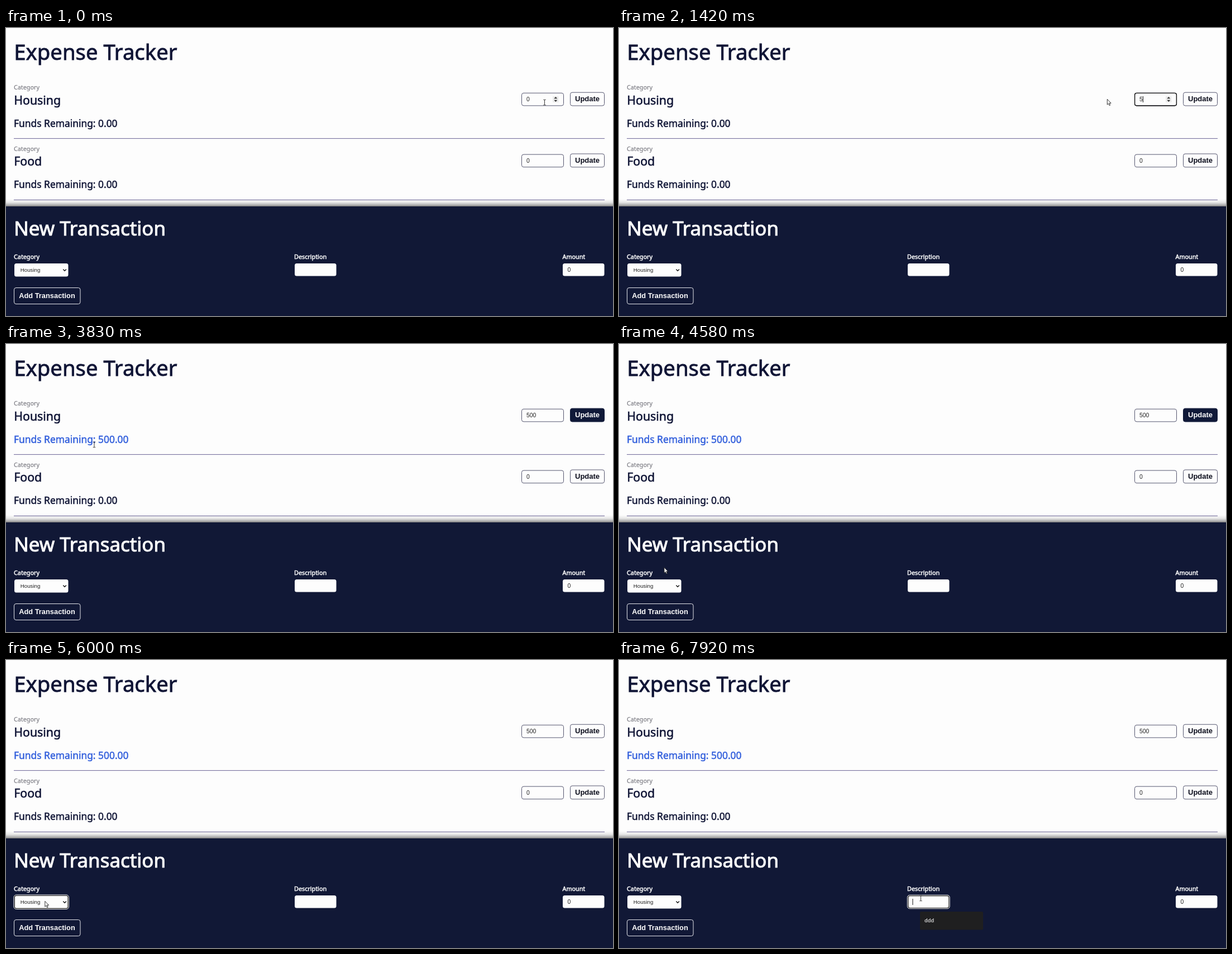
Animation, 1087 px wide and 515 px high, one loop 8 s. Source, as an HTML page:

```html
<!DOCTYPE html>
<html lang="en">
<head>
<meta charset="utf-8">
<title>Expense Tracker</title>
<style>
  html, body { margin: 0; width: 100%; height: 100%; overflow: hidden; background: #fdfdfd; }
  svg { display: block; width: 1087px; height: 515px; }
  text { white-space: pre; }
  .sans { font-family: "Noto Sans", sans-serif; fill: #0f1435; stroke: #0f1435; paint-order: stroke; }
  .title { font-size: 38.3px; stroke-width: .8px; }
  .title2 { font-size: 34.9px; stroke-width: 1px; }
  .name { font-size: 21.3px; stroke-width: .55px; }
  .funds { font-size: 17.4px; stroke-width: .5px; }
  .funds.set { fill: #325fdc; stroke: #325fdc; }
  .tag { font-size: 10.8px; fill: #77777f; stroke: #77777f; stroke-width: .15px; }
  .label { font-size: 10.8px; stroke-width: .5px; }
  .light { fill: #fdfdfd; stroke: #fdfdfd; }
  .ui { font: 10.4px "Liberation Sans", Arial, sans-serif; fill: #222; }
  .small { font-size: 9.7px; }
  .btn { font: bold 13px "Liberation Sans", Arial, sans-serif; fill: #0b0d1c; }
  .box { fill: #fdfdfd; stroke: #565770; }
  .field { fill: #fdfdfd; }
  .rule { stroke: #6a6396; }
  .on rect { fill: #101938; stroke: #101938; }
  .on text { fill: #fdfdfd; }
  .hide { display: none; }
  .ring rect { fill: none; }
</style>
</head>
<body>
<svg viewBox="0 0 1087 515">
  <defs>
    <linearGradient id="shade" x1="0" y1="0" x2="0" y2="1">
      <stop offset="0" stop-color="#000" stop-opacity="0"/>
      <stop offset=".45" stop-color="#000" stop-opacity=".09"/>
      <stop offset=".8" stop-color="#000" stop-opacity=".3"/>
      <stop offset="1" stop-color="#000" stop-opacity=".5"/>
    </linearGradient>
  </defs>
  <rect width="1087" height="515" fill="#fdfdfd"/>
  <text class="sans title" x="14.2" y="56.5">Expense Tracker</text>

  <g id="rows"></g>

  <rect x="0" y="306" width="1087" height="13" fill="url(#shade)"/>
  <rect x="0" y="319" width="1087" height="196" fill="#111836"/>
  <text class="sans title2 light" x="14.2" y="371">New Transaction</text>
  <text class="sans label light" x="14" y="412.5">Category</text>
  <text class="sans label light" x="516" y="412.5">Description</text>
  <text class="sans label light" x="996.5" y="412.5">Amount</text>

  <rect id="select" class="field" x="15" y="421" width="96.5" height="23.5" rx="3.5"/>
  <text class="ui small" x="25.8" y="436">Housing</text>
  <path d="M102.3 431.5l2.8 2.8 2.8-2.8" fill="none" stroke="#111" stroke-width="1.4"/>
  <rect class="field" x="517" y="421" width="74.5" height="22.5" rx="3.5"/>
  <rect class="field" x="997" y="421" width="74.5" height="22.5" rx="3.5"/>
  <text class="ui" x="1005.6" y="436">0</text>

  <rect x="14.5" y="464.5" width="118.5" height="29" rx="3.5" fill="none" stroke="#e4e5ea"/>
  <text class="btn" style="font-size:12.85px;fill:#fdfdfd" x="23.2" y="483">Add Transaction</text>

  <g id="selectRing" class="ring">
    <rect x="15.2" y="421.1" width="96.1" height="23.3" rx="3.4" stroke="#111" stroke-width="1.4"/>
    <rect x="14" y="420" width="98.5" height="25.5" rx="4.5" stroke="#fdfdfd"/>
  </g>
  <g id="descRing" class="ring">
    <rect x="517.6" y="421.6" width="73.4" height="22" rx="3" stroke="#111" stroke-width="1.4"/>
    <rect x="516.4" y="420.4" width="75.8" height="24.2" rx="4.2" stroke="#fdfdfd"/>
  </g>
  <path id="descCaret" d="M526 427v11" stroke="#111"/>
  <g id="hint">
    <rect x="539" y="450" width="113" height="32.5" rx="2" fill="#1f1f20"/>
    <text x="547" y="469.3" font-family="Open Sans, sans-serif" font-weight="600" font-size="9.2" fill="#e4e4e4">ddd</text>
  </g>

  <g id="list"></g>

  <g id="arrow"><path d="M.3.3v9.8l2.2-2 1.6 3.5 1.6-.7-1.6-3.5h3z" fill="#fdfdfd" stroke="#222" stroke-width=".9"/></g>
  <g id="beam"><path d="M-2.2-4.8h1.5q.7 0 .7.7V4.1q0 .7.7.7h1.5M-2.2 4.8h1.5q.7 0 .7-.7M2.2-4.8H.7q-.7 0-.7.7" fill="none" stroke="#222" stroke-width=".9"/></g>
  <g id="hand"><path d="M-.9.6q.9-1.2 1.8 0v4l4 .9q1.4.4 1.2 1.9l-.7 3.2-.8 1.9H.3L-1 9.8-3.2 7q-.3-1.4 1-1.2l1.3 1.2z" fill="#fdfdfd" stroke="#222" stroke-width=".9"/></g>
</svg>
<script>
const $ = id => document.getElementById(id);
const LOOP = 8000, STEP = LOOP / 96;

const row = (id, name, dy) => `<g transform="translate(0 ${dy})">
  <text class="sans tag" x="13.9" y="110">Category</text>
  <text class="sans name" x="14.3" y="136.5">${name}</text>
  <text class="sans funds" id="${id}Funds" x="14" y="176.5">Funds Remaining: 0.00</text>
  <path class="rule" d="M14 197.6H1072"/>
  <rect class="box" x="923.5" y="116.3" width="75" height="22.6" rx="3.5"/>
  <rect id="${id}Mark" x="931.6" y="121.5" width="6.6" height="12" fill="#2f74d0"/>
  <text class="ui" id="${id}Value" x="931.9" y="131.2">0</text>
  <g id="${id}Spin">
    <rect x="979" y="122" width="10.5" height="11" fill="#ececec"/>
    <path d="M981.3 126.3h6l-3-3.2zM981.3 128.7h6l-3 3.2z" fill="#333"/>
  </g>
  <rect id="${id}Ring" x="923.6" y="116.4" width="74.8" height="22.6" rx="3.4" fill="none" stroke="#0c0c0c" stroke-width="1.4"/>
  <path id="${id}Caret" stroke="#111"/>
  <g id="${id}Btn">
    <rect class="box" x="1010.5" y="115.2" width="61" height="23.8" rx="3.5"/>
    <text class="btn" x="1019" y="131.2">Update</text>
  </g>
</g>`;
$('rows').innerHTML = row('home', 'Housing', 0) + row('food', 'Food', 109.8);
['Mark', 'Spin', 'Ring', 'Caret'].forEach(part => $('food' + part).classList.add('hide'));

const options = ['Housing', 'Food', 'Transportation', 'Utilities', 'Clothing',
  'Healthcare', 'Personal', 'Education', 'Entertainment'];
$('list').innerHTML = `
  <rect x="14.7" y="309.8" width="96.6" height="111" rx="3.5" fill="#fdfdfd" stroke="#8a8a94" stroke-width=".6"/>
  <path d="M15 322V313q0-3 3-3h90q3 0 3 3v9z" fill="#1966c6"/>` +
  options.map((name, i) => `<text class="ui small" x="26" y="${319.3 + i * 12.2}"
    ${i ? '' : 'style="fill:#fdfdfd"'}>${name}</text>`).join('');

// Pointer stops: time, x, y of the hot spot
const stops = [
  [0, 964.5, 133], [450, 964.5, 133], [950, 874, 127], [1780, 874, 127],
  [2450, 1058.5, 132.5], [3050, 1058.5, 132.5], [3650, 158, 180], [4000, 158, 180],
  [4750, 69.5, 431], [6200, 69.5, 431], [6830, 540.5, 426], [LOOP, 540.5, 426]
];

function pointerAt(t) {
  const i = stops.findIndex((s, n) => n && t <= s[0]);
  const [t0, x0, y0] = stops[i - 1], [t1, x1, y1] = stops[i];
  const p = (t - t0) / (t1 - t0), e = p * p * (3 - 2 * p);
  return [x0 + (x1 - x0) * e, y0 + (y1 - y0) * e];
}

const show = (id, on) => $(id).classList.toggle('hide', !on);
const between = (t, a, b) => t >= a && t < b;
const blink = (t, start) => (t - start) % 1000 < 500;

function draw(t) {
  const [x, y] = pointerAt(t);
  const over = (l, top, r, bottom) => x > l && x < r && y > top && y < bottom;
  const overInput = over(923, 116, 999, 139);
  const overBtn = over(1010, 115, 1072, 139);

  const value = t < 1330 ? '0' : '500'.slice(0, t < 1480 ? 1 : t < 1580 ? 2 : 3);
  const focus = between(t, 400, 2640);
  const marked = between(t, 580, 1330);
  const typedAt = t < 1330 ? 400 : t < 1480 ? 1330 : 1580;
  $('homeValue').textContent = value;
  $('homeValue').style.fill = marked ? '#fdfdfd' : '';
  show('homeMark', marked);
  show('homeRing', focus);
  show('homeSpin', focus || overInput);
  show('homeCaret', focus && !marked && blink(t, typedAt));
  $('homeCaret').setAttribute('d', `M${932.6 + value.length * 5.8} 122v11`);
  $('homeBtn').classList.toggle('on', overBtn || between(t, 2640, 4900));

  const updated = t >= 2900;
  $('homeFunds').textContent = 'Funds Remaining: ' + (updated ? '500.00' : '0.00');
  $('homeFunds').classList.toggle('set', updated);

  const open = between(t, 4900, 5820);
  show('list', open);
  $('select').style.fill = open ? '#e4e4e4' : '';
  show('selectRing', between(t, 5820, 6900));
  show('descRing', t >= 6900);
  show('descCaret', t >= 6900 && blink(t, 6900));
  show('hint', t >= 7490);

  const textHit = overInput || over(517, 421, 592, 444) ||
    over(14, 162, updated ? 220 : 200, 184) || between(t, 400, 1000);
  const kind = overBtn ? 'hand' : textHit ? 'beam' : 'arrow';
  for (const id of ['arrow', 'beam', 'hand']) show(id, id === kind);
  $(kind).setAttribute('transform', `translate(${x} ${y})`);
}

const start = performance.now();
function tick() {
  const t = (performance.now() - start) % LOOP;
  draw(Math.min(95, Math.floor((t + 3.4) / STEP)) * STEP);
  requestAnimationFrame(tick);
}
tick();
</script>
</body>
</html>
```
